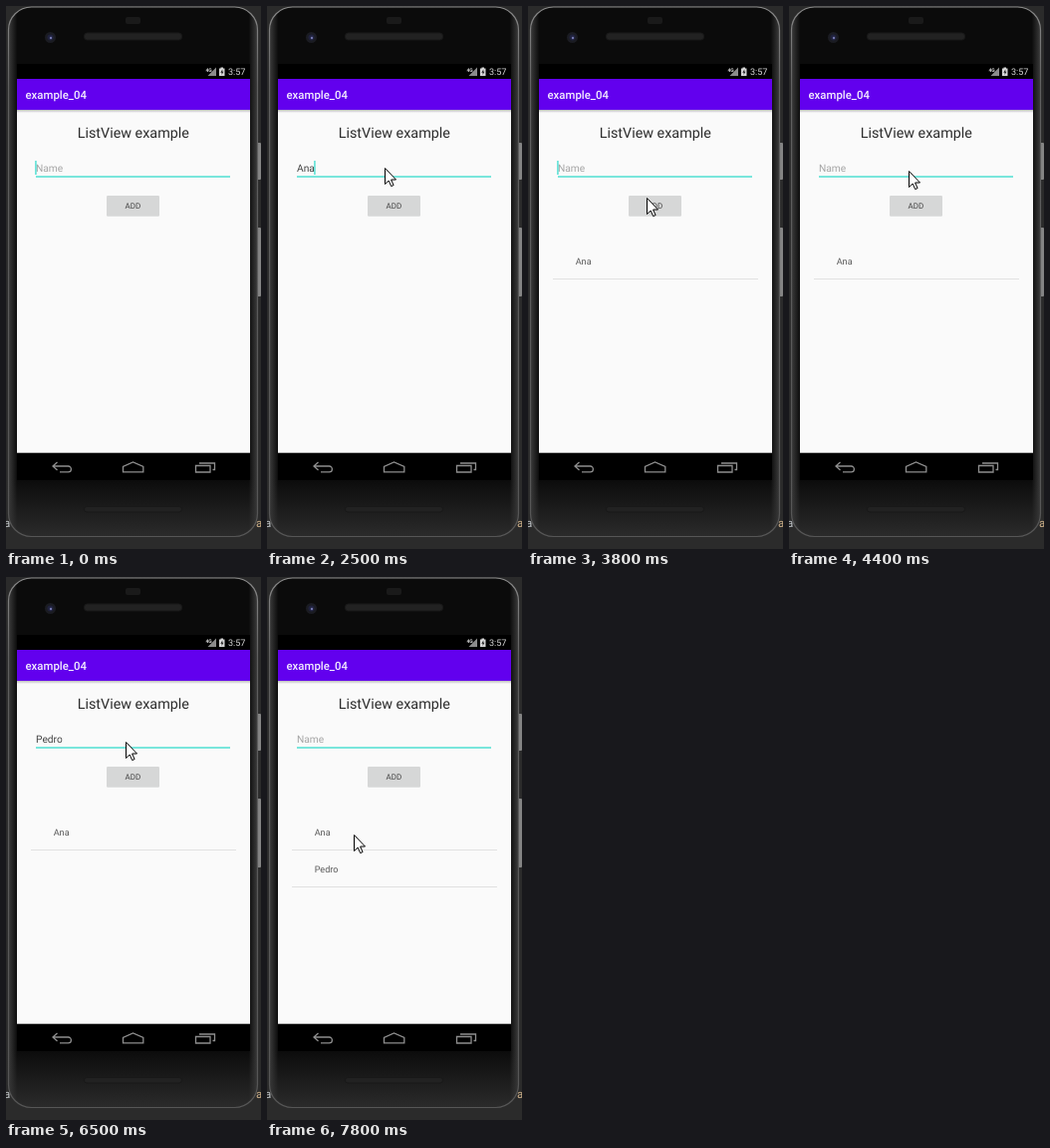
Recreate the animation shown at these times as an HTML page. Size 256 px wide and 544 px high, loop 8000 ms.

```html
<!DOCTYPE html>
<html lang="en">
<head>
<meta charset="utf-8">
<title>List demo</title>
<style>
html, body { margin: 0; width: 100%; height: 100%; overflow: hidden; background: #2b2b2b; }
svg { display: block; width: 256px; height: 544px; }
text { font-family: Roboto, "Noto Sans", sans-serif; text-rendering: geometricPrecision; }
.field { font-size: 10.24px; fill: #444; }
.item { font-size: 9.1px; fill: #5a5a5a; }
.icon { fill: none; stroke: #8e8e8e; stroke-width: 1.3; }

/* every change is a hard step; 1.25% is 100 ms */
.anim { animation: 8s step-end infinite; }
.typing { animation-name: typing; }
.caret { animation-name: blink; }
.hint { animation-name: hint; }
.first { animation-name: first; }
.second { animation-name: second; }
.row1 { animation-name: row1; }
.row2 { animation-name: row2; }
.pointer { animation-name: pointer; }

@keyframes typing {
  0%, 46.25%, 91.25%, 100% { transform: translate(30px, 0); }
  17.5% { transform: translate(37px, 0); }
  30% { transform: translate(42.5px, 0); }
  31.25% { transform: translate(48px, 0); }
  63.75% { transform: translate(37px, 0); }
  68.75% { transform: translate(42px, 0); }
  70% { transform: translate(48px, 0); }
  73.75% { transform: translate(51.5px, 0); }
  75% { transform: translate(57px, 0); }
}
@keyframes blink {
  0%, 8.75%, 17.5%, 28.75%, 42.5%, 58.75%, 87.5% { opacity: 1; }
  2.5%, 15%, 23.75%, 36.25%, 52.5%, 81.25%, 97.5%, 100% { opacity: 0; }
}
@keyframes hint {
  0%, 46.25%, 91.25%, 100% { opacity: 1; }
  17.5%, 63.75% { opacity: 0; }
}
@keyframes first {
  0%, 46.25%, 100% { opacity: 0; }
  17.5% { opacity: 1; }
}
@keyframes second {
  0%, 91.25%, 100% { opacity: 0; }
  63.75% { opacity: 1; }
}
@keyframes row1 {
  0% { opacity: 0; }
  46.25%, 100% { opacity: 1; }
}
@keyframes row2 {
  0% { opacity: 0; }
  91.25%, 100% { opacity: 1; }
}
@keyframes pointer {
  0% { transform: translate(300px, 109px); }
  1.25% { transform: translate(171px, 109px); }
  2.5% { transform: translate(152px, 125px); }
  3.75% { transform: translate(134px, 143px); }
  5% { transform: translate(122px, 157px); }
  6.25% { transform: translate(118px, 161px); }
  12.5% { transform: translate(118px, 162px); }
  40% { transform: translate(118px, 166px); }
  41.25% { transform: translate(118px, 177px); }
  42.5% { transform: translate(119px, 188px); }
  43.75% { transform: translate(119px, 192px); }
  48.75% { transform: translate(119px, 190px); }
  50% { transform: translate(119px, 183px); }
  51.25% { transform: translate(120px, 175px); }
  52.5% { transform: translate(120px, 169px); }
  53.75% { transform: translate(120px, 166px); }
  55% { transform: translate(120px, 165px); }
  83.75% { transform: translate(121px, 168px); }
  85% { transform: translate(122px, 177px); }
  86.25% { transform: translate(123px, 186px); }
  87.5% { transform: translate(122px, 191px); }
  88.75% { transform: translate(121px, 192px); }
  95% { transform: translate(113px, 211px); }
  96.25% { transform: translate(96px, 243px); }
  97.5%, 100% { transform: translate(87px, 258px); }
}
</style>
</head>
<body>
<svg viewBox="0 0 256 544">
  <defs>
    <linearGradient id="shade" x1="0" y1="0" x2="0" y2="1">
      <stop offset="0" stop-color="#bcbcbc"/>
      <stop offset="1" stop-color="#fafafa"/>
    </linearGradient>
    <linearGradient id="sides">
      <stop offset="0" stop-color="#3c3c3c"/>
      <stop offset="0.035" stop-color="#0b0b0b"/>
      <stop offset="0.965" stop-color="#0b0b0b"/>
      <stop offset="1" stop-color="#3c3c3c"/>
    </linearGradient>
    <linearGradient id="foot" x1="0" y1="0" x2="0" y2="1">
      <stop offset="0.89" stop-color="#333" stop-opacity="0"/>
      <stop offset="1" stop-color="#333" stop-opacity="0.8"/>
    </linearGradient>
    <linearGradient id="rim" x1="0" y1="0" x2="0" y2="1">
      <stop offset="0" stop-color="#8a8a8a"/>
      <stop offset="0.15" stop-color="#606060"/>
      <stop offset="1" stop-color="#565656"/>
    </linearGradient>
  </defs>

  <!-- desk and phone body -->
  <rect width="256" height="544" fill="#2b2b2b"/>
  <text x="-2" y="522" font-size="11.500" fill="#c4c8cc">a</text>
  <text x="251" y="522" font-size="11.500" fill="#d2b48c">a</text>
  <rect x="252" y="137" width="4" height="37" rx="1" fill="#858585"/>
  <rect x="252" y="222" width="4" height="69" rx="1" fill="#858585"/>
  <rect x="2.500" y="1" width="250" height="530.500" rx="23" fill="url(#sides)"/>
  <rect x="2.500" y="1" width="250" height="530.500" rx="23" fill="url(#foot)" stroke="url(#rim)" stroke-width="1.200"/>
  <rect x="120" y="11" width="15" height="7" rx="2" fill="#1a1a1a"/>
  <g fill="#222" stroke="#181818">
    <rect x="78.500" y="27" width="98" height="7" rx="3"/>
    <rect x="78.500" y="501.500" width="98" height="5.500" rx="2.700"/>
  </g>
  <circle cx="44.500" cy="31.500" r="5.500" fill="#1b1c22"/>
  <circle cx="44.500" cy="31.500" r="3" fill="#20223e"/>
  <circle cx="45" cy="32" r="1.200" fill="#7478b0"/>

  <!-- status bar -->
  <rect x="11" y="58" width="234" height="417" fill="#000"/>
  <path d="M202.500 70L211 61.500V70Z" fill="#8c8c8c"/>
  <text x="200.500" y="66" font-size="5" font-weight="700" fill="#ddd">4G</text>
  <path d="M214 62.500H215.500V61.500H218V62.500H219.500V70H214Z" fill="#d8d8d8"/>
  <path d="M217.300 63.500L215.300 66.700H216.600V69L218.400 65.800H217.300Z" fill="#222"/>
  <text x="222.900" y="69" font-size="9.100" fill="#d8d8d8">3:57</text>

  <!-- app -->
  <rect x="11" y="104" width="234" height="343.700" fill="#fafafa"/>
  <rect x="11" y="104" width="234" height="3" fill="url(#shade)"/>
  <rect x="11" y="73" width="234" height="31" fill="#6200ee"/>
  <text x="19.500" y="93" font-size="11.380" font-weight="500" fill="#f4eefe">example_04</text>
  <text x="127.800" y="131.500" font-size="14.350" text-anchor="middle" fill="#2c2c2c">ListView example</text>

  <!-- name field: a cover moves with the caret and reveals the letters -->
  <text class="field anim first" x="30" y="166.300">Ana</text>
  <text class="field anim second" x="30" y="166.300">Pedro</text>
  <g class="anim typing"><rect x="-0.400" y="154" width="40" height="16" fill="#fafafa"/></g>
  <text class="field anim hint" x="30" y="166.300" style="fill:#a6a6a6">Name</text>
  <rect x="30" y="170.400" width="195" height="1.200" fill="#25d9c9"/>
  <g class="anim typing"><rect class="anim caret" x="-0.600" y="155" width="1.100" height="14" fill="#16d6c5"/></g>

  <!-- button -->
  <rect x="101" y="190" width="53" height="20.800" rx="1.200" fill="#d6d7d7"/>
  <text x="127.300" y="203.200" font-size="7.970" text-anchor="middle" fill="#444">ADD</text>

  <!-- list -->
  <g class="anim row1">
    <text class="item" x="47.700" y="258.500">Ana</text>
    <rect x="25" y="273" width="206" height="1" fill="#e1e1e1"/>
  </g>
  <g class="anim row2">
    <text class="item" x="47.700" y="295.500">Pedro</text>
    <rect x="25" y="310" width="206" height="1" fill="#e1e1e1"/>
  </g>

  <!-- navigation bar -->
  <g class="icon" transform="translate(0 .5)">
    <path d="M51.500 456.500L47 460.500L51.500 464.500M47 460.500H62.500A2.900 2.900 0 0 1 62.500 466.300H54"/>
    <path d="M117.500 466.300V461L127.500 456.500L137.800 461V466.300Z"/>
    <path d="M190.500 460H205V466.500H190.500ZM194 457.500H209.500V464H207.500"/>
  </g>

  <path class="anim pointer" d="M.5 .5V16.500L4.200 13L6.700 18.600L9.100 17.500L6.600 12H11.500Z" fill="#fff" stroke="#000"/>
</svg>
</body>
</html>
```
